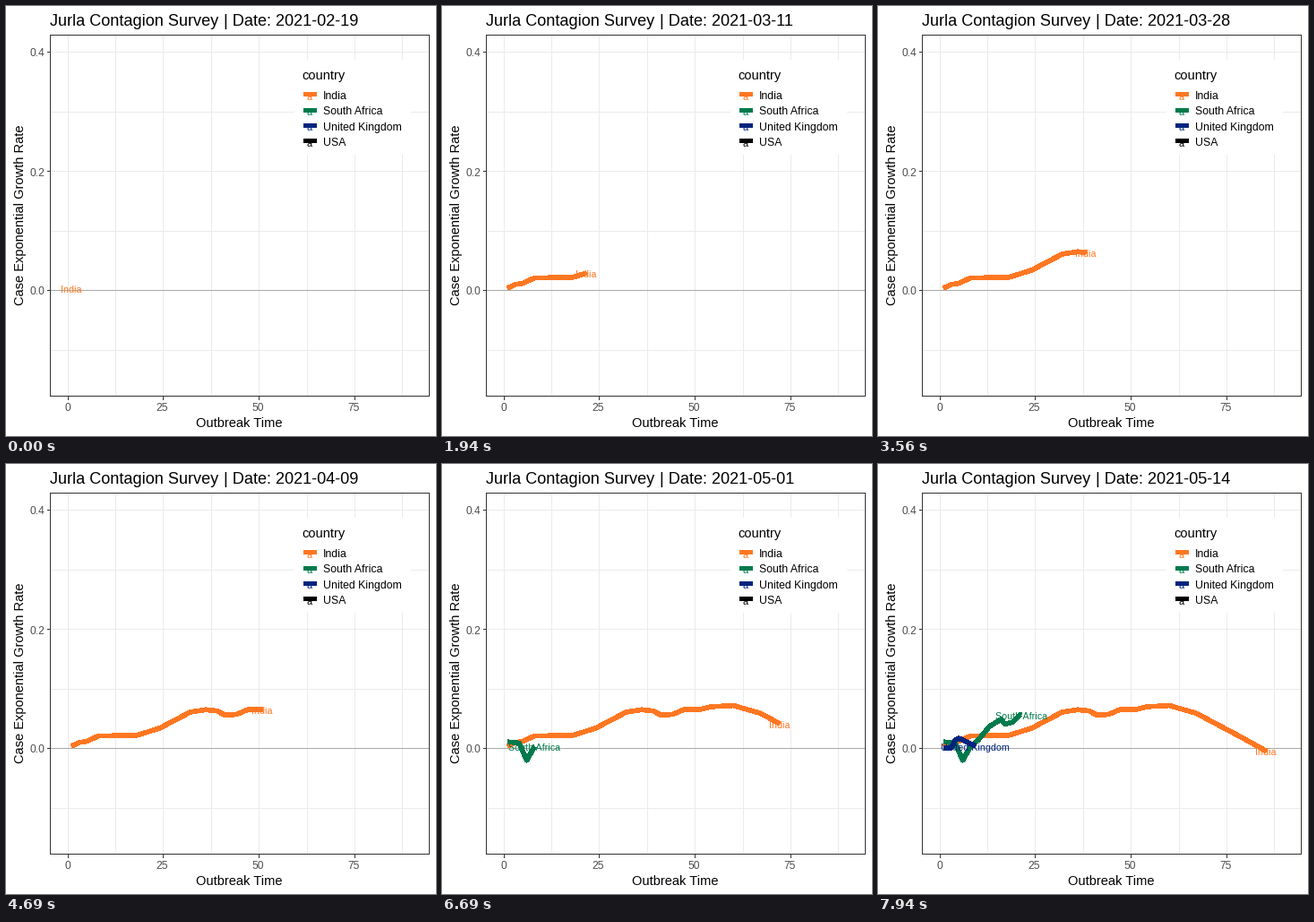
A matplotlib script for the animation above (8000 ms loop, 480 px wide and 480 px high).

```python
import math

import numpy as np
import matplotlib.pyplot as plt
from matplotlib.animation import FuncAnimation
from matplotlib.patches import Rectangle

plt.rcParams["font.family"] = ["Liberation Sans", "DejaVu Sans"]

SIZE, DPI = 480, 100
PT = 72 / DPI                      # points per pixel
FRAMES, LOOP = 128, 8000
DAYS_PER_FRAME = 0.6638
START = np.datetime64("2021-02-19")

# name, colour, first day, turning points as (outbreak day, rate in thousandths)
COUNTRIES = [
    ("India", "#FF7722", 0,
     [(1, 4), (3, 10), (5, 12), (8, 21), (18, 22), (24, 34), (32, 61),
      (36, 65), (39, 63), (41, 56), (44, 57), (47, 65), (51, 65), (54, 70),
      (60, 72), (67, 59), (79, 18), (86, -7)]),
    ("South Africa", "#007A4D", 64,
     [(1, 11), (4, 9), (6, -20), (8, 3), (10, 14), (13, 37), (16, 49),
      (17, 41), (19, 44), (21, 57), (22, 56)]),
    ("United Kingdom", "#00247D", 76,
     [(1, 1), (3, 1), (4, 14), (5, 17), (10, 2)]),
    ("USA", "#000000", math.inf, []),
]


def px(day):
    return 69 + 4.273 * np.asarray(day)


def py(rate):
    return 317.5 - 665 * np.asarray(rate)


def snap(v):
    return math.floor(v + 0.01)


fig = plt.figure(figsize=(SIZE / DPI, SIZE / DPI), dpi=DPI, facecolor="white")
ax = fig.add_axes([0, 0, 1, 1])
ax.set_xlim(0, SIZE)
ax.set_ylim(SIZE, 0)
ax.axis("off")


def write(x, y, s, size, color="black", **kw):
    return ax.text(x, y, s, fontsize=size * PT, color=color, **kw)


def stroke(xs, ys, color, width=1, z=1):
    return ax.plot(xs, ys, color=color, lw=width * PT, zorder=z,
                   antialiased=False, solid_capstyle="butt",
                   solid_joinstyle="round")[0]


LEFT, RIGHT, TOP, BOTTOM = 49, 472, 32, 435

# Grid, ticks and axis text
for k in range(8):
    x = snap(px(12.5 * k))
    stroke([x, x], [TOP, BOTTOM], "#EBEBEB")
    if k % 2 == 0:
        stroke([x, x], [BOTTOM, BOTTOM + 4], "#333333")
        write(x - 0.5, 452, f"{12.5 * k:.0f}", 12, "#4D4D4D", ha="center")
for k in range(-1, 5):
    y = snap(py(k / 10))
    stroke([LEFT, RIGHT], [y, y], "#EBEBEB")
    if k % 2 == 0:
        stroke([LEFT - 3, LEFT], [y, y], "#333333")
        write(43.2, y + 5.5, f"{k / 10:.1f}", 12, "#4D4D4D", ha="right")
zero = snap(py(0))
stroke([LEFT, RIGHT], [zero, zero], "#A9A9A9", z=2)

panel = Rectangle((LEFT, TOP), RIGHT - LEFT, BOTTOM - TOP, fill=False,
                  ec="#333333", lw=PT, antialiased=False, zorder=8)
ax.add_patch(panel)

write(48.6, 22, "Jurla Contagion Survey", 18.1)
title = write(242.6, 22, "", 18.1)
write(260.5, 470, "Outbreak Time", 14.67, ha="center")
write(20, 233.5, "Case Exponential Growth Rate", 14.67, rotation=90,
      ha="center", rotation_mode="anchor")

# Legend
ax.add_patch(Rectangle((322, 60), 130, 106, fc="white", ec="none", zorder=5))
write(330.2, 82, "country", 14.67, zorder=6)
for i, (name, color, _, _) in enumerate(COUNTRIES):
    y = 98.4 + 17.28 * i
    stroke([332, 346], [y, y], color, 5, z=6)
    write(338.8, y + 6.5, "a", 11, color, ha="center", zorder=6)
    write(354.2, y + 5.6, name, 12.3, zorder=6)

lines, labels = [], []
for i, (name, color, _, _) in enumerate(COUNTRIES):
    lines.append(stroke([], [], color, 4.6, z=3 + i / 10))
    label = write(0, 0, name, 10.6, color, ha="center", zorder=4, clip_on=True)
    label.set_clip_path(panel)
    labels.append(label)


def draw(frame):
    elapsed = frame * DAYS_PER_FRAME
    title.set_text(f"| Date: {START + int(elapsed)}")
    for (_, _, begin, points), line, label in zip(COUNTRIES, lines, labels):
        shown = elapsed >= begin
        line.set_visible(shown)
        label.set_visible(shown)
        if not shown:
            continue
        head = 1 + elapsed - begin
        days, rates = np.array(points).T
        rates = rates / 1000
        tip = np.interp(head, days, rates)
        past = days < head
        line.set_data(px(np.append(days[past], head)),
                      py(np.append(rates[past], tip)))
        label.set_position((px(head) - 0.4, py(tip) + 5))
    return [title, *lines, *labels]


anim = FuncAnimation(fig, draw, frames=FRAMES, interval=LOOP / FRAMES,
                     init_func=lambda: draw(0), repeat=True, repeat_delay=0,
                     blit=False)
plt.show()
```
